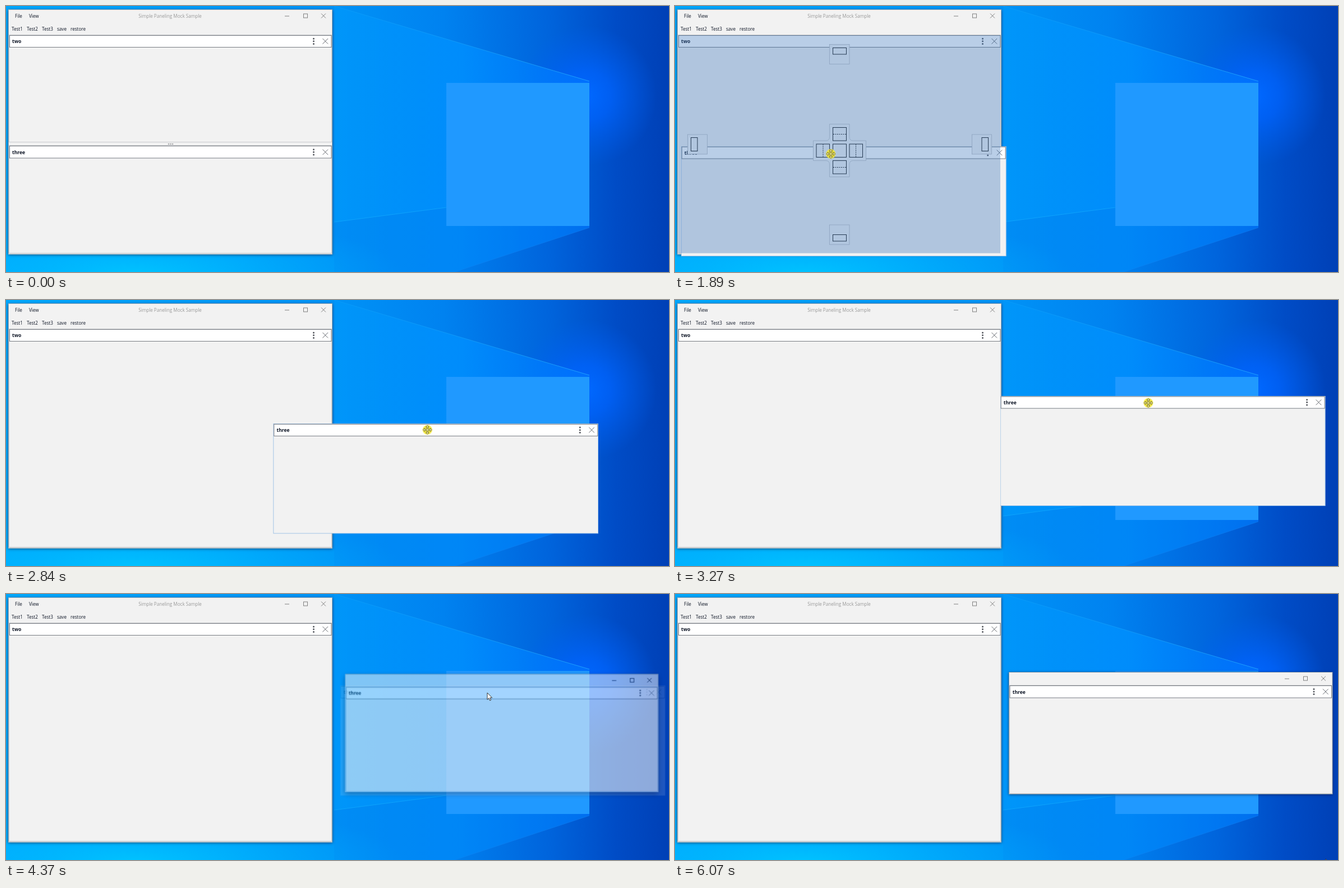
Write an HTML page that moves like this. It is 1182 by 474 pixels and loops after 6.16 s.

```html
<!DOCTYPE html>
<html lang="en">
<head>
<meta charset="utf-8">
<title>Panel dragging</title>
<style>
html, body { margin: 0; width: 100%; height: 100%; overflow: hidden; background: #0090f8; }
svg.stage { display: block; width: 100vw; height: 100vh; }
text { font: 8.1px "Open Sans", "Noto Sans", sans-serif; fill: #0c1424; }
text.name { font-size: 8.5px; font-weight: 700; }
.caption { fill: #999; text-anchor: middle; }
.bar { fill: #fff; stroke: #777b82; }
.body { fill: #f2f2f2; }
.rule { fill: none; stroke: #c9cbcd; }
.hot { fill: none; stroke: #8fbce8; }
.tint { fill: rgba(56, 116, 185, .35); }
.pad { fill: #f2f2f2; stroke: #b8babd; stroke-width: .8; }
.slot { fill: none; stroke: #1c1c1c; }
.dash { stroke: #1c1c1c; stroke-dasharray: 2 1.5; }
.idle { color: #808080; }
.live { color: #111; }
.shade { fill: #f2f2f2; filter: drop-shadow(0 1.5px 2.5px rgba(0, 10, 40, .6)); }
.deep { fill: #f2f2f2; filter: drop-shadow(0 3px 5px rgba(0, 10, 40, .65)); }

.a { animation: 6160ms linear infinite; }
.cut { animation-timing-function: step-end; }
.docked { animation-name: docked; }
.hover1 { animation-name: hover1; }
.focus { animation-name: focus; }
.guides { animation-name: guides; }
.whole { animation-name: whole; }
.half { animation-name: half; }
.float { animation-name: float; }
.lift { animation-name: lift; }
.framed { animation-name: framed; transform-origin: 883px 248px; }
.hover2 { animation-name: hover2; }
.bright { animation-name: bright; }
.dim { animation-name: dim; }
.mouse { animation-name: mouse; }
.arrow { animation-name: arrow; }
.grip { animation-name: grip; }
.spot { animation-name: spot; }

@keyframes docked { 0% { visibility: visible } 26.29%, 100% { visibility: hidden } }
@keyframes hover1 { 0% { opacity: 0 } 7.3%, 100% { opacity: 1 } }
@keyframes focus { 0% { visibility: hidden } 22.56% { visibility: visible } 26.29%, 100% { visibility: hidden } }
@keyframes guides { 0% { visibility: hidden } 26.29% { visibility: visible } 41.07%, 100% { visibility: hidden } }
@keyframes whole { 0% { visibility: hidden } 26.29% { visibility: visible } 36.1%, 100% { visibility: hidden } }
@keyframes half { 0% { visibility: hidden } 36.1% { visibility: visible } 41.07%, 100% { visibility: hidden } }
@keyframes lift { 0% { visibility: hidden } 26.29% { visibility: visible } 71.2%, 100% { visibility: hidden } }
@keyframes hover2 { 0% { opacity: 1 } 84.5%, 100% { opacity: 0 } }
@keyframes bright { 0% { opacity: 1 } 98.53%, 100% { opacity: 0 } }
@keyframes dim { 0% { opacity: 0 } 98.53%, 100% { opacity: 1 } }
@keyframes arrow { 0% { visibility: visible } 26.29% { visibility: hidden } 68.66%, 100% { visibility: visible } }
@keyframes grip { 0% { visibility: hidden } 26.29% { visibility: visible } 68.66%, 100% { visibility: hidden } }
@keyframes spot { 0% { visibility: hidden } 22.56% { visibility: visible } 68.66%, 100% { visibility: hidden } }

@keyframes float {
  0%, 26.29% { transform: translate(5px, 249px); opacity: 1; animation-timing-function: cubic-bezier(.7, 0, .9, .4) }
  35.88% { transform: translate(75px, 256px) }
  37.34% { transform: translate(135px, 256px); animation-timing-function: cubic-bezier(.35, .4, .7, .88) }
  46.1% { transform: translate(476px, 220px); animation-timing-function: cubic-bezier(.3, .4, .6, 1) }
  56.49%, 69.3% { transform: translate(595.5px, 163px); opacity: 1 }
  71.2%, 100% { transform: translate(595.5px, 163px); opacity: 0 }
}
@keyframes framed {
  0%, 69.3% { transform: scale(.93); opacity: 0; animation-timing-function: ease-out }
  73.8%, 100% { transform: none; opacity: 1 }
}
@keyframes mouse {
  0%, 1.5% { transform: translate(1070px, 476px); animation-timing-function: cubic-bezier(.3, .3, .6, 1) }
  11.2%, 12.2% { transform: translate(389px, 275px); animation-timing-function: cubic-bezier(.3, .3, .6, 1) }
  18.18% { transform: translate(274px, 263px) }
  20.29%, 26% { transform: translate(269px, 263px); animation-timing-function: cubic-bezier(.7, 0, .9, .4) }
  35.88% { transform: translate(368px, 268px) }
  37.34% { transform: translate(427px, 268px); animation-timing-function: cubic-bezier(.35, .4, .7, .88) }
  46.1% { transform: translate(751px, 231.5px); animation-timing-function: cubic-bezier(.3, .4, .6, 1) }
  56.49%, 83.4% { transform: translate(858px, 176px); animation-timing-function: cubic-bezier(.4, .1, .6, 1) }
  93.18%, 94.2% { transform: translate(1156px, 468px) }
  94.8%, 100% { transform: translate(1160px, 472px) }
}
</style>
</head>
<body>
<svg class="stage" viewBox="0 0 1182 474" preserveAspectRatio="none">
  <defs>
    <linearGradient id="sky">
      <stop offset="0" stop-color="#00a8fc"/>
      <stop offset=".5" stop-color="#0092f6"/>
      <stop offset=".66" stop-color="#0082f0"/>
      <stop offset=".82" stop-color="#0064dc"/>
      <stop offset=".92" stop-color="#004cc6"/>
      <stop offset="1" stop-color="#0040b6"/>
    </linearGradient>
    <radialGradient id="glow" gradientUnits="userSpaceOnUse" cx="1035" cy="160" r="125">
      <stop offset="0" stop-color="#0068ff"/>
      <stop offset=".35" stop-color="#0064ff" stop-opacity=".75"/>
      <stop offset="1" stop-color="#0060f0" stop-opacity="0"/>
    </radialGradient>
    <radialGradient id="pool" gradientUnits="userSpaceOnUse" cx="0" cy="0" r="1"
      gradientTransform="translate(230 480) scale(480 110)">
      <stop offset="0" stop-color="#00c4ff"/>
      <stop offset="1" stop-color="#00b0ff" stop-opacity="0"/>
    </radialGradient>
    <linearGradient id="beam" gradientUnits="userSpaceOnUse" x1="580" x2="1040">
      <stop offset="0" stop-color="#009cff" stop-opacity=".35"/>
      <stop offset=".5" stop-color="#0090ff" stop-opacity=".8"/>
      <stop offset="1" stop-color="#0074ff" stop-opacity=".7"/>
    </linearGradient>
    <linearGradient id="edge" gradientUnits="userSpaceOnUse" x1="585" x2="1040">
      <stop offset="0" stop-color="#1cb0ff" stop-opacity=".25"/>
      <stop offset="1" stop-color="#2cb4ff" stop-opacity=".7"/>
    </linearGradient>

    <!-- header buttons, anchored at the right end of a bar -->
    <g id="tools">
      <g fill="#55585e">
        <circle cx="-31.5" cy="6.2" r="1.5"/><circle cx="-31.5" cy="10.8" r="1.5"/><circle cx="-31.5" cy="15.4" r="1.5"/>
      </g>
      <path d="M-15.5 6l9.6 9.6m0-9.6l-9.6 9.6" stroke="#666a70" fill="none"/>
    </g>
    <!-- window buttons, anchored at the close button -->
    <g id="system" stroke="currentColor" fill="none">
      <path d="M-69 .5h8M-4 -4l8 8m0-8l-8 8"/>
      <rect x="-35.5" y="-3.5" width="7" height="7"/>
    </g>
    <g id="menus">
      <text x="16" y="21">File</text><text x="41" y="21">View</text>
    </g>
  </defs>

  <!-- desktop -->
  <rect width="1182" height="474" fill="url(#sky)"/>
  <rect width="1182" height="474" fill="url(#glow)"/>
  <path d="M585 0L1040 134V395L800 474H585Z" fill="url(#beam)"/>
  <path d="M585 385L785 359 1040 395 800 474H585Z" fill="#0078e8" opacity=".3"/>
  <rect y="360" width="720" height="114" fill="url(#pool)"/>
  <path d="M585 0L1040 134" stroke="url(#edge)"/>
  <path d="M585 385L785 359" stroke="#18b0ff" opacity=".6"/>
  <path d="M800 474L1040 395" stroke="#1884f0" opacity=".4"/>
  <rect x="785" y="137" width="255" height="255" fill="#2099ff"/>

  <!-- main window -->
  <rect class="shade" x="4" y="6.5" width="578" height="436"/>
  <rect class="deep a cut focus" x="4" y="6.5" width="578" height="436"/>
  <rect x="4.5" y="6.5" width="577" height="435.5" fill="#f2f2f2" stroke="#a3adb6"/>
  <use href="#menus"/>
  <text class="caption" x="292.5" y="21">Simple Paneling Mock Sample</text>
  <use href="#system" class="idle" x="566" y="17.5"/>
  <g class="a cut focus">
    <text class="caption" x="292.5" y="21" style="fill:#111">Simple Paneling Mock Sample</text>
    <use href="#system" class="live" x="566" y="17.5"/>
  </g>
  <text x="10" y="43.5">Test1</text>
  <text x="37" y="43.5">Test2</text>
  <text x="64" y="43.5">Test3</text>
  <text x="91" y="43.5">save</text>
  <text x="115" y="43.5">restore</text>

  <rect class="rule" x="5.5" y="51.5" width="575" height="389"/>
  <rect class="bar" x="6.5" y="52.5" width="573.5" height="21"/>
  <text class="name" x="11" y="66.3">two</text>
  <use href="#tools" x="580" y="52"/>

  <g class="a cut docked">
    <rect class="body" x="5" y="242" width="576" height="199.5"/>
    <path class="rule" d="M5 242.5H581"/>
    <rect class="rule" x="5.5" y="248.5" width="575" height="192"/>
    <g fill="#a4a6a8">
      <circle cx="290" cy="246" r="1.3"/><circle cx="293.5" cy="246" r="1.3"/><circle cx="297" cy="246" r="1.3"/>
    </g>
    <rect class="bar" x="6.5" y="249.5" width="573.5" height="21.5"/>
    <rect class="hot a cut hover1" x="5.5" y="248.5" width="575" height="192"/>
    <text class="name" x="11" y="263.8">three</text>
    <use href="#tools" x="580" y="249.5"/>
  </g>

  <!-- dragged panel -->
  <g class="a cut lift">
    <g class="a float">
      <rect x=".5" y=".5" width="579" height="195.5" fill="#f2f2f2" stroke="#a3c4e6"/>
      <rect class="bar" x="1.5" y="1.5" width="577" height="21"/>
      <text class="name" x="6.2" y="15.3">three</text>
      <use href="#tools" x="578.5" y="1"/>
    </g>
  </g>

  <!-- docking guides -->
  <g class="a cut guides">
    <g class="pad">
      <rect x="275.5" y="68.5" width="35.5" height="35"/>
      <rect x="22.5" y="229" width="35" height="35"/>
      <rect x="529.5" y="229" width="35" height="35"/>
      <rect x="275.5" y="390" width="35.5" height="35"/>
      <path d="M275.5 210.5h35.500v23q0 6.500 6.500 6.500h23v35.500h-23q-6.500 0-6.500 6.500v22.500h-35.500v-22.500q0-6.500-6.500-6.500h-22.500v-35.500h22.500q6.500 0 6.500-6.500z"/>
    </g>
    <g class="slot">
      <rect x="281.5" y="74.500" width="24" height="11.500"/>
      <rect x="28.500" y="234.500" width="11.500" height="24"/>
      <rect x="547" y="234.500" width="11.500" height="24"/>
      <rect x="281.500" y="407.500" width="24" height="11.500"/>
      <rect x="281.500" y="246" width="24" height="23.500"/>
      <rect x="281.500" y="216.500" width="24" height="23.500"/>
      <rect x="281.500" y="275.500" width="24" height="23.500"/>
      <rect x="252" y="246" width="23.500" height="23.500"/>
      <rect x="311" y="246" width="23.500" height="23.500"/>
    </g>
    <path class="dash" d="M282 228.500h23M282 287.500h23M264 246.500v23M322.500 246.500v23"/>
  </g>
  <rect class="tint a cut whole" x="6" y="52" width="574" height="388.500"/>
  <rect class="tint a cut half" x="293" y="52" width="287" height="388.500"/>

  <!-- panel in its own window -->
  <g class="a framed">
    <rect class="shade a cut dim" x="595" y="139" width="577" height="217.500"/>
    <rect class="deep a cut bright" x="595" y="139" width="577" height="217.500"/>
    <rect x="595.500" y="139.500" width="576.500" height="217" fill="#f2f2f2" stroke="#98a4b0"/>
    <use href="#system" class="idle a cut dim" x="1156" y="150.500"/>
    <use href="#system" class="live a cut bright" x="1156" y="150.500"/>
    <rect class="rule" x="596.500" y="162.500" width="575" height="193"/>
    <rect class="bar" x="597" y="163.500" width="573.500" height="21.500"/>
    <rect class="hot a cut hover2" x="596.500" y="162.500" width="575" height="193"/>
    <text class="name" x="601.700" y="177.800">three</text>
    <use href="#tools" x="1170.500" y="163.200"/>
  </g>

  <!-- pointer -->
  <g class="a mouse">
    <circle class="a cut spot" r="8.500" fill="#f4e838" opacity=".9"/>
    <path class="a cut arrow" d="M0 0V12.200L2.800 9.600 4.600 13.800 6.600 13 4.800 8.900H8.600Z" fill="#fff" stroke="#222" stroke-width=".9"/>
    <path class="a cut grip" d="M0-8L3-5H1V-1H5V-3L8 0 5 3V1H1V5H3L0 8-3 5H-1V1H-5V3L-8 0-5-3V-1H-1V-5H-3Z" fill="#fbf5a0" stroke="#4a4710" stroke-width=".8"/>
  </g>
</svg>
</body>
</html>
```
